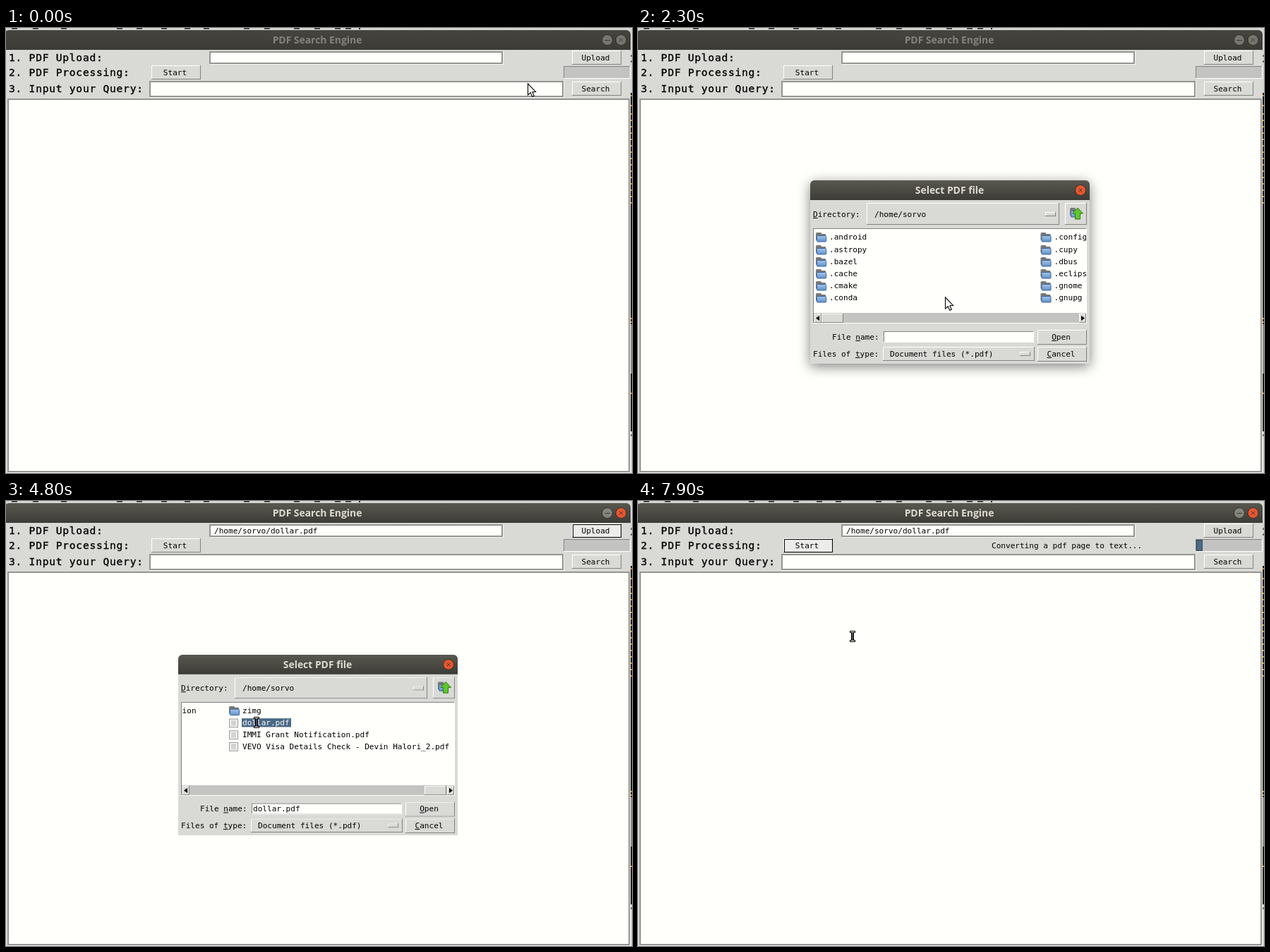
An HTML page with a canvas that plays this animation: 887x631 px, repeating every 8 s.

```html
<!DOCTYPE html>
<html lang="en">
<head>
<meta charset="utf-8">
<title>PDF Search Engine</title>
<style>
html, body { margin: 0; width: 100%; height: 100%; overflow: hidden; background: #d9d9d6; }
canvas { display: block; }
</style>
</head>
<body>
<canvas id="stage" width="887" height="631"></canvas>
<script>
const ctx = document.getElementById('stage').getContext('2d');
const LOOP = 8000, STEP = 100;
const FACE = '#d9d9d6', LIT = '#ececea', PAPER = '#fffffc', DARK = '#828280', TROUGH = '#c3c3c1', BLUE = '#4a6984';
const MONO = '11.07px "DejaVu Sans Mono", monospace';
const LABEL = '14.6px "DejaVu Sans Mono", monospace';
const TITLE = 'bold 13.9px "Open Sans", sans-serif';
const CHAR = 6.66, COLUMN = 318.5, ROW = 17.2;
const HOME = '/home/sorvo', FILE = 'dollar.pdf';

const folders = ('.android .astropy .bazel .cache .cmake .conda .config .cupy .dbus .eclipse .gnome .gnupg ' +
  '.gradle .ipython .java .jupyter .keras .local .matplotlib .nano .npm .nv .pip .pki ' +
  '.ssh .vim .wget anaconda3 backup bert-test bin build caffe captures classes cmake-3.12 ' +
  'cnn-demo code darknet data dataset demo Desktop docs Documents Downloads edge-test envs ' +
  'examples face-demo flask-app gan-test images include keras-ocr lib logs Music notebooks opencv ' +
  'Project-BERT Project-Sudoku protobuf-all-3.6.1 Public pycuda pytorch ' +
  'React real-time-detector RetroGame single_pdf snap SVP_4 ' +
  'tensorflow-object-detection-evaluation test_images text_miner utils venv webcam zimg')
  .split(' ').map(name => name.replace('SVP_', 'SVP '));
const files = [FILE, 'IMMI Grant Notification.pdf', 'VEVO Visa Details Check - Devin Halori_2.pdf'];
const entries = [...folders, ...files];

// Keys: time, then values
const pointerPath = [
  [300, 739, 79], [400, 739, 74], [500, 739, 74], [800, 782, 60], [1100, 817, 43], [1800, 817, 43],
  [2100, 560, 270], [2300, 435, 382], [2400, 435, 382], [2700, 279, 412], [3100, 459, 412], [3400, 545, 412],
  [3700, 612, 412], [4200, 355, 314], [5100, 355, 314], [5300, 446, 278], [5400, 446, 278],
  [5500, 457, 240], [5700, 326, 102], [5800, 326, 102], [5900, 246, 64], [6100, 246, 64], [6300, 304, 192]
];
const scrollPath = [[2700, 260, 0], [3100, 440, 2203], [3400, 526, 3203.5], [3700, 593, 4076.5]];

function at(path, t) {
  const i = path.findIndex(key => key[0] > t);
  if (i < 0) return path.at(-1).slice(1);
  if (i === 0) return path[0].slice(1);
  const a = path[i - 1], b = path[i], k = (t - a[0]) / (b[0] - a[0]);
  return a.slice(1).map((v, n) => v + (b[n + 1] - v) * k);
}

function box(x1, y1, x2, y2, color) {
  ctx.fillStyle = color;
  ctx.fillRect(x1, y1, x2 - x1, y2 - y1);
}

function bevel(x1, y1, x2, y2, face, sunken) {
  box(x1, y1, x2, y2, sunken ? '#fff' : DARK);
  box(x1, y1, x2 - 1, y2 - 1, sunken ? DARK : '#fff');
  box(x1 + 1, y1 + 1, x2 - 1, y2 - 1, face);
}

function field(x1, y1, x2, y2) {
  box(x1, y1, x2 + 1, y2 + 1, '#f4f4f2');
  box(x1, y1, x2, y2, '#949492');
  box(x1 + 2, y1 + 2, x2 - 2, y2 - 2, PAPER);
}

function text(s, x, y, color = '#000', font = MONO, align = 'left', spacing = 0) {
  ctx.font = font;
  ctx.textAlign = align;
  ctx.letterSpacing = spacing + 'px';
  ctx.fillStyle = color;
  ctx.fillText(s, x, y);
}

function label(s, y) {
  text(s, 4, y, '#000', LABEL, 'left', 0.75);
  ctx.lineWidth = 0.35;
  ctx.strokeStyle = '#000';
  ctx.strokeText(s, 4, y);
}

function keyed(s, x, y, mark) {
  text(s, x, y);
  box(x + mark * CHAR, y + 1, x + (mark + 1) * CHAR, y + 2, '#000');
}

function button(s, x, y, { h = 20, lit, ring, pressed, mark } = {}) {
  bevel(x, y, x + 70, y + h, lit ? LIT : FACE, pressed);
  if (ring) {
    ctx.strokeStyle = '#000';
    ctx.lineWidth = 1;
    ctx.strokeRect(x + 1.5, y + 1.5, 68, h - 2);
  }
  const left = x + 33.5 - s.length * CHAR / 2, base = y + 14;
  if (mark) keyed(s, left, base, 0); else text(s, left, base);
}

function disc(x, y, r, color, glyph, cross) {
  ctx.fillStyle = color;
  ctx.strokeStyle = '#33322e';
  ctx.lineWidth = 1;
  ctx.beginPath();
  ctx.arc(x, y, r, 0, 7);
  ctx.fill();
  ctx.stroke();
  ctx.strokeStyle = glyph;
  ctx.beginPath();
  if (cross) {
    ctx.moveTo(x - 2.5, y - 2.5); ctx.lineTo(x + 2.5, y + 2.5);
    ctx.moveTo(x + 2.5, y - 2.5); ctx.lineTo(x - 2.5, y + 2.5);
  } else {
    ctx.moveTo(x - 3.5, y + 0.5); ctx.lineTo(x + 3.5, y + 0.5);
  }
  ctx.stroke();
}

function titleBar(s, x1, y1, x2, focused) {
  const g = ctx.createLinearGradient(0, y1, 0, y1 + 28);
  g.addColorStop(0, focused ? '#59584f' : '#45443f');
  g.addColorStop(1, '#3c3b36');
  ctx.fillStyle = g;
  ctx.beginPath();
  ctx.roundRect(x1, y1, x2 - x1, 28, [6, 6, 0, 0]);
  ctx.fill();
  text(s, (x1 + x2) / 2 - 0.5, y1 + 18.8, focused ? '#dfdbd2' : '#85837b', TITLE, 'center');
}

function backdrop() {
  box(0, 0, 887, 631, '#d6d6d4');
  for (const x of [8, 38, 78, 157, 185, 220, 253, 280, 337, 366, 408, 437, 466, 481]) box(x, 0, x + 8, 1.5, '#222');
  box(500, 0, 502, 2, '#222');
  box(885, 92, 887, 572, '#1f1f1d');
  for (let y = 95; y < 250; y += 7 + y * 5 % 9) box(885, y, 887, y + 2, '#c79a28');
  for (const y of [411, 416, 517]) box(885, y, 887, y + 2, '#c79a28');
  box(885, 420, 887, 490, '#8b8b89');
  for (const y of [38, 46, 576]) box(885, y, 887, y + 3, '#777');
}

function mainWindow(t) {
  const focused = t >= 1300 && t < 1600 || t >= 4800;
  const started = t >= 6000;
  box(0, 20, 885, 631, FACE);
  titleBar('PDF Search Engine', -2, 3, 885, focused);
  disc(852, 17, 7.5, focused ? '#85837a' : '#77766e', '#3c3b36');
  disc(871.5, 17, 7.5, focused ? '#e9552e' : '#77766e', '#3c3b36', true);

  label('1. PDF Upload:', 47);
  label('2. PDF Processing:', 68);
  label('3. Input your Query:', 91);
  field(288, 33, 704, 51);
  field(203, 75, 790, 98);
  field(2, 100, 884, 630);
  if (t >= 4800) text(HOME + '/' + FILE, 295, 46);

  const chosen = t >= 4800 && t < 6000;
  button('Upload', 802, 32, { lit: t >= 900 && t < 1600 || chosen, ring: chosen, pressed: t >= 1300 && t < 1500 });
  button('Start', 206, 53, { lit: t >= 5900, ring: started, pressed: t === 6000 });
  button('Search', 802, 76);

  bevel(790, 54, 885, 72, TROUGH, true);
  if (t >= 6100) text('Converting a pdf page to text...', 501, 67);
  if (t >= 6500) {
    const end = Math.round(792 + (t - 6500) / 175);
    box(791, 55, end, 71, '#34495c');
    box(792, 56, end - 1, 70, BLUE);
  }
}

function folder(x, y) {
  ctx.fillStyle = '#77787a';
  ctx.beginPath();
  ctx.roundRect(x, y, 8, 5, 1.5);
  ctx.roundRect(x, y + 2, 14, 9, 1);
  ctx.fill();
  const g = ctx.createLinearGradient(0, y + 4, 0, y + 13);
  g.addColorStop(0, '#a9c9ec');
  g.addColorStop(1, '#5f91cb');
  ctx.fillStyle = g;
  ctx.strokeStyle = '#3d659b';
  ctx.lineWidth = 1;
  ctx.beginPath();
  ctx.roundRect(x + 1.5, y + 4.5, 13, 8.5, 1);
  ctx.fill();
  ctx.stroke();
}

function sheet(x, y) {
  box(x, y, x + 13, y + 13, '#9a9a98');
  box(x + 1, y + 1, x + 12, y + 12, '#f1f1ef');
  for (let i = 3; i < 11; i += 2) box(x + 3, y + i, x + 10, y + i + 1, '#b9b9b7');
}

function upIcon() {
  folder(612, 255);
  ctx.fillStyle = '#5fc62c';
  ctx.strokeStyle = '#2f7a12';
  ctx.beginPath();
  for (const [x, y] of [[623, 255], [630.5, 263], [626.5, 263], [626.5, 271], [619.5, 271], [619.5, 263], [615.5, 263]]) ctx.lineTo(x, y);
  ctx.closePath();
  ctx.fill();
  ctx.stroke();
}

function arrowButton(x, dir) {
  bevel(x, 405, x + 10, 418, FACE);
  ctx.fillStyle = '#000';
  ctx.beginPath();
  ctx.moveTo(x + 5 + 3 * dir, 411.5);
  ctx.lineTo(x + 5 - 2 * dir, 408);
  ctx.lineTo(x + 5 - 2 * dir, 415);
  ctx.fill();
}

function fileList(t) {
  const [thumb, scroll] = at(scrollPath, t);
  bevel(248, 284, 636, 419, PAPER, true);
  ctx.save();
  ctx.beginPath();
  ctx.rect(250, 286, 385, 118);
  ctx.clip();
  entries.forEach((name, i) => {
    const x = 252 + Math.floor(i / 6) * COLUMN - scroll, y = 296.4 + i % 6 * ROW;
    if (x < -80 || x > 640) return;
    const picked = name === FILE && t >= 4300;
    if (i < folders.length) folder(x, Math.round(y) - 6); else sheet(x, Math.round(y) - 6);
    if (picked) box(x + 18, y - 6, x + 88, y + 6.5, BLUE);
    text(name, x + 19, Math.round(y + 4), picked ? '#fff' : '#000');
  });
  ctx.restore();
  box(249, 404, 635, 418, TROUGH);
  arrowButton(250, -1);
  arrowButton(625, 1);
  bevel(Math.round(thumb), 405, Math.round(thumb) + 31, 418, FACE);
}

function dialogBody(t) {
  keyed('Directory:', 248, 268, 0);
  bevel(324, 248, 597, 279, FACE);
  text(HOME, 335, 268);
  bevel(577, 261, 592, 267, FACE);
  bevel(605, 248, 636, 279, FACE);
  upIcon();
  fileList(t);
  keyed('File name:', 275, 442, 5);
  bevel(348, 430, 561, 446, PAPER, true);
  if (t >= 4300) text(FILE, 350, 442);
  else if (t >= 2500 && (t - 2500) % 900 < 600) box(350, 432, 351, 443, '#000');
  button('Open', 566, 428, { h: 21, mark: true });
  keyed('Files of type:', 248, 466, 9);
  bevel(347, 452, 562, 472, FACE);
  text('Document files (*.pdf)', 357, 466);
  bevel(541, 459, 556, 465, FACE);
  button('Cancel', 566, 452, { h: 21, mark: true });
}

function dialog(t) {
  if (t < 1600 || t >= 5000) return;
  ctx.save();
  if (t >= 4800) {
    const closing = t > 4800;
    ctx.globalAlpha = closing ? 0.5 : 1;
    ctx.translate(0, 346);
    ctx.scale(1, closing ? 0.93 : 0.984);
    ctx.translate(0, -346);
  } else {
    ctx.shadowColor = 'rgba(0,0,0,.5)';
    ctx.shadowBlur = 18;
    ctx.shadowOffsetY = 4;
  }
  ctx.fillStyle = FACE;
  ctx.beginPath();
  ctx.roundRect(244, 216, 396, 260, [6, 6, 0, 0]);
  ctx.fill();
  ctx.shadowColor = 'transparent';
  titleBar('Select PDF file', 244, 216, 640, true);
  disc(627, 230, 7.5, '#e9552e', '#3c3b36', true);
  if (t >= 1900) dialogBody(t);
  ctx.restore();
}

function arrow() {
  ctx.beginPath();
  for (const [x, y] of [[0, 0], [0, 16], [3.7, 12.8], [6.2, 18.3], [8.8, 17.1], [6.4, 11.7], [11, 11.4]]) ctx.lineTo(x + 0.5, y);
  ctx.closePath();
  ctx.fillStyle = '#fff';
  ctx.strokeStyle = '#111';
  ctx.lineWidth = 1.2;
  ctx.fill();
  ctx.stroke();
}

function beam() {
  for (const [pad, color] of [[1, '#000'], [0, '#fff']]) {
    box(-1 - pad, -7 - pad, 1 + pad, 7 + pad, color);
    for (const y of [-7, 6]) box(-3 - pad, y - pad, 3 + pad, y + 1 + pad, color);
  }
  box(-0.7, -6, 0.7, 6, '#000');
}

function pointer(t) {
  const [x, y] = at(pointerPath, t);
  const overText = t >= 4800 && t < 5900 || t >= 6200;
  ctx.save();
  ctx.translate(Math.round(x), Math.round(y));
  if (overText) beam(); else arrow();
  ctx.restore();
}

function draw(now) {
  const t = Math.floor(now % LOOP / STEP) * STEP;
  backdrop();
  mainWindow(t);
  dialog(t);
  pointer(t);
  requestAnimationFrame(() => draw(performance.now() - start));
}

const start = performance.now();
draw(0);
</script>
</body>
</html>
```
